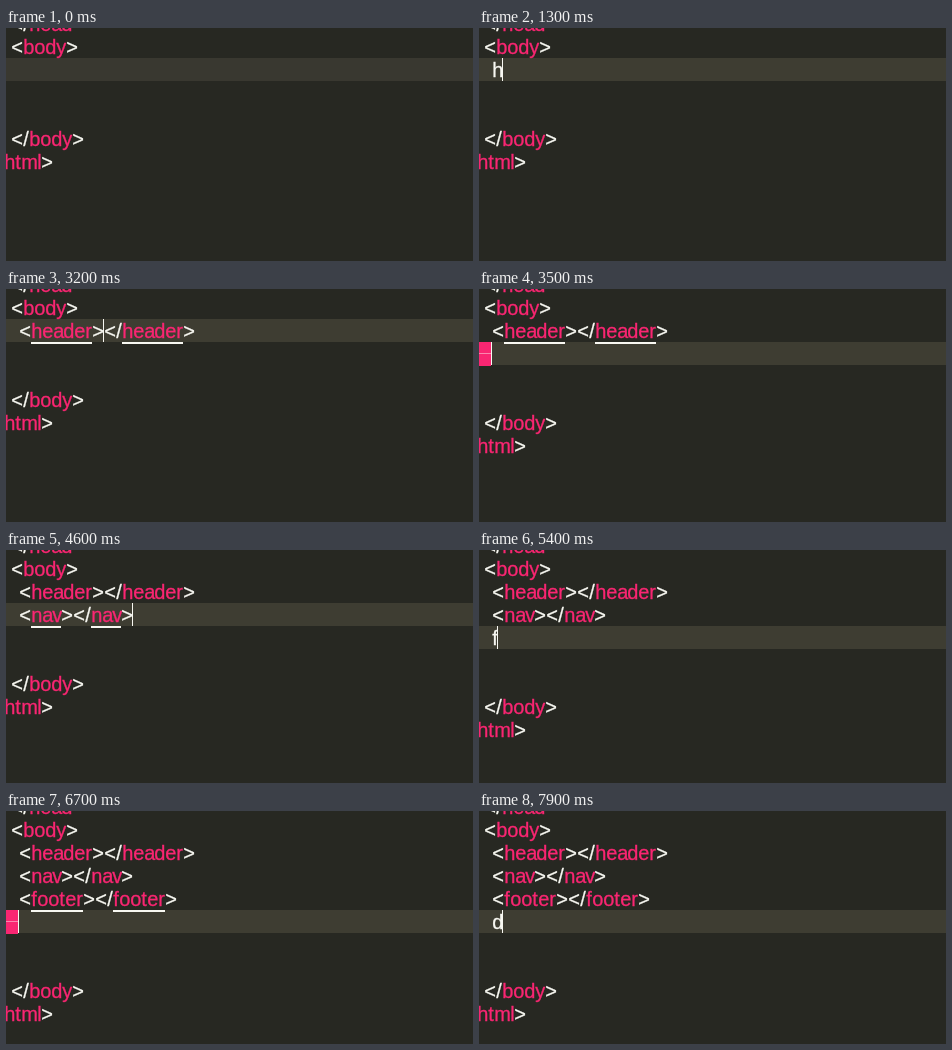
An HTML page with a canvas that plays this animation: 467x233 px, repeating every 8000 ms.

```html
<!DOCTYPE html>
<html lang="en">
<head>
<meta charset="utf-8">
<style>
  html, body { margin: 0; height: 100%; overflow: hidden; background: #272822; }
  canvas { display: block; }
</style>
</head>
<body>
<canvas id="stage" width="467" height="233"></canvas>
<script>
const ctx = document.getElementById('stage').getContext('2d');
const LOOP = 8000, LINE = 23, TOP = 30, LEFT = 13, OUTER = 5;
const WHITE = '#f8f8f2', PINK = '#f92672';
const TAGS = ['header', 'nav', 'footer'].map(name => `<${name}></${name}>`);

// Whole-pixel letter advances; all other letters take 11.
const ADVANCE = { '<': 12, '>': 12, '/': 6, a: 10, f: 6, l: 4, m: 16, r: 7, t: 6, v: 9, y: 10 };
const widthOf = text => [...text].reduce((sum, c) => sum + (ADVANCE[c] || 11), 0);

// [time, row, text, caret index (-1 = hidden), marks]
// marks: d = dim row, s = stray indent, u = matched tag, p = matched tag on the row above
const STEPS = [
  [0, 0, '', -1, 'd'],
  [800, 0, '', 0, 's'],
  [1300, 0, 'h', 1, ''],
  [1500, 0, 'he', 2, ''],
  [1700, 0, 'hea', 3, ''],
  [2000, 0, 'head', 4, ''],
  [2400, 0, 'heade', 5, ''],
  [2600, 0, 'header', 6, ''],
  [2800, 0, TAGS[0], 8, ''],
  [3100, 0, TAGS[0], 8, 'u'],
  [3300, 0, TAGS[0], 17, 'u'],
  [3500, 1, '', 0, 'sp'],
  [3700, 1, '', 0, 's'],
  [3800, 1, 'n', 1, ''],
  [4000, 1, 'na', 2, ''],
  [4200, 1, 'nav', 3, ''],
  [4400, 1, TAGS[1], 5, ''],
  [4600, 1, TAGS[1], 11, 'u'],
  [4800, 2, '', 0, 'sp'],
  [5000, 2, '', 0, 's'],
  [5300, 2, 'f', 1, ''],
  [5500, 2, 'fo', 2, ''],
  [5600, 2, 'foo', 3, ''],
  [5800, 2, 'foot', 4, ''],
  [5900, 2, 'foote', 5, ''],
  [6000, 2, 'footer', 6, ''],
  [6200, 2, TAGS[2], 8, ''],
  [6400, 2, TAGS[2], 17, 'u'],
  [6700, 3, '', 0, 'sp'],
  [6900, 3, '', 0, 's'],
  [7000, 3, '', -1, 's'],
  [7200, 3, '', 0, 's'],
  [7800, 3, 'd', 1, '']
];

function rect(color, x, y, w, h) {
  ctx.fillStyle = color;
  ctx.fillRect(x, y, w, h);
}

// A hairline stroke gives the letters their slightly heavy screen weight.
function drawText(text, x, top) {
  const isTag = text[0] === '<';
  for (const c of text) {
    ctx.fillStyle = ctx.strokeStyle = isTag && /[a-z]/.test(c) ? PINK : WHITE;
    ctx.fillText(c, x + 0.3, top + 19);
    ctx.strokeText(c, x + 0.3, top + 19);
    x += widthOf(c);
  }
}

function underlineTag(tag, top) {
  const name = tag.match(/[a-z]+/)[0], w = widthOf(name);
  for (const before of ['<', `<${name}></`])
    rect(WHITE, LEFT + widthOf(before), top + LINE, w, 2);
}

function draw(time) {
  const [, row, text, caret, marks] = STEPS.findLast(step => step[0] <= time);
  const y = TOP + row * LINE;

  rect('#272822', 0, 0, 467, 233);
  rect(marks.includes('d') ? '#393830' : '#3e3d32', 0, y, 467, LINE);
  ctx.font = '20px "Liberation Sans", Arial, sans-serif';
  ctx.lineWidth = 0.3;

  drawText('</head', OUTER, TOP - 2 * LINE);
  drawText('<body>', OUTER, TOP - LINE);
  for (let i = 0; i < row; i++) drawText(TAGS[i], LEFT, TOP + i * LINE);
  drawText(text, LEFT, y);
  drawText('</body>', OUTER, y + 3 * LINE);
  drawText('</html>', -20, y + 4 * LINE);

  if (marks.includes('s')) {
    rect(PINK, 0, y, 12, LINE + 1);
    rect('#fb86ae', 0, y + 11, 12, 1);
  }
  if (marks.includes('u')) underlineTag(text, y);
  if (marks.includes('p')) underlineTag(TAGS[row - 1], y - LINE);
  if (caret >= 0) rect(WHITE, LEFT - 1 + widthOf(text.slice(0, caret)), y, 1, LINE);
}

const start = performance.now();
function tick() {
  draw((performance.now() - start) % LOOP);
  requestAnimationFrame(tick);
}
tick();
</script>
</body>
</html>
```
